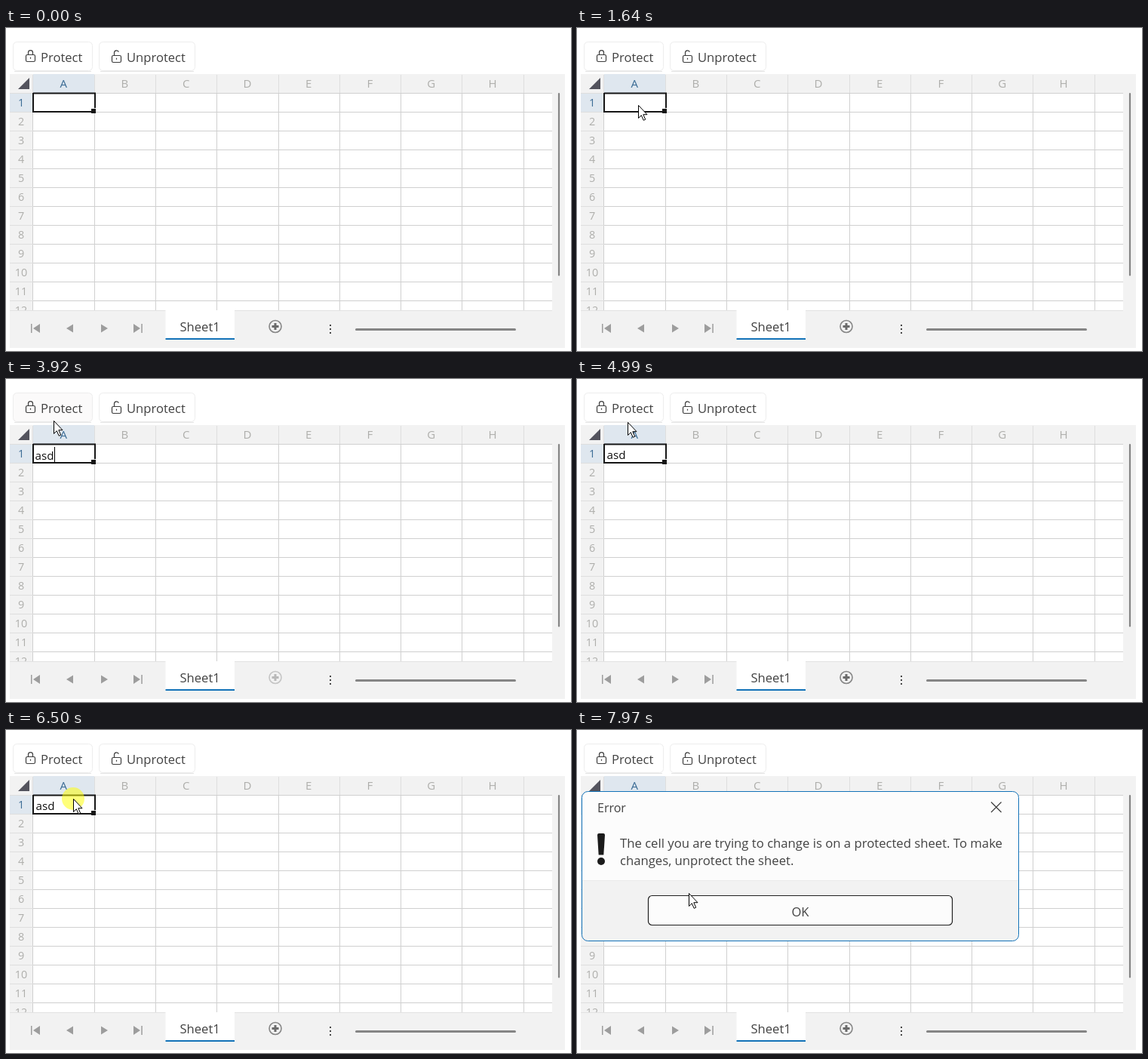
Recreate the animation shown at these times as an HTML page. Size 749 px wide and 428 px high, loop 8000 ms.

```html
<!DOCTYPE html>
<html lang="en">
<head>
<meta charset="utf-8">
<style>
  html, body { margin: 0; width: 100%; height: 100%; overflow: hidden; background: #fff; }
  svg { display: block; }
  text { font-family: "Open Sans", "Noto Sans", sans-serif; font-size: 16.6px; fill: #424242; white-space: pre; }
  .head { font-size: 15px; fill: #aeaeab; text-anchor: middle; }
  .row { font-size: 14.4px; }
  .active { fill: #3b6c95; }
  .cell { font-size: 15.2px; fill: #111; }
  .message { font-size: 16.7px; }
  .button { fill: #fff; stroke: #ededed; }
  .lock { fill: none; stroke: #3c3c3c; stroke-width: 1.2; }
  .nav { fill: #9d9d9d; }
</style>
</head>
<body>
<svg width="749" height="428" viewBox="0 0 749 428">
  <path d="M11 57.5H113M125 57.5H249" stroke="#e4e4e4"/>
  <rect class="button" id="protect" x="9.5" y="18.5" width="105" height="38" rx="5"/>
  <rect class="button" x="123.5" y="18.5" width="127" height="38" rx="5"/>
  <g class="lock">
    <rect x="26.5" y="35.5" width="12" height="9" rx="1.8"/>
    <path d="M29.5 35V32.5a3 2.8 0 0 1 6 0V35M32.5 38.8v2"/>
    <rect x="140.5" y="36.5" width="12" height="9" rx="1.8"/>
    <path d="M143.500 36V32.500a3 2.800 0 0 1 5.800-.8M146.500 39.800v2"/>
  </g>
  <text x="46" y="45">Protect</text>
  <text x="160" y="45">Unprotect</text>

  <rect x="5" y="61" width="736" height="363" fill="#f2f2f2"/>
  <rect x="36" y="86" width="688" height="289" fill="#fff"/>
  <path d="M36 61h81v25h-81zM5 86h31v25H5z" fill="#dfe7ef"/>
  <path d="M31 66V81H16z" fill="#53535d"/>
  <g id="grid"></g>
  <path d="M36 86.500H118V106M36 86V111H113" fill="none" stroke="#161616" stroke-width="2"/>
  <rect x="113" y="107" width="6" height="6" fill="#161616"/>
  <text class="cell" id="value"></text>
  <rect id="caret" y="90" width="1" height="20"/>

  <path d="M5 374.5H724" stroke="#e2e2e2"/>
  <rect x="5" y="375" width="736" height="49" fill="#f2f2f2"/>
  <rect x="211.5" y="374" width="91.5" height="39" fill="#fff"/>
  <rect x="211.5" y="411" width="91.5" height="2" fill="#1272b8"/>
  <text x="230.5" y="402">Sheet1</text>
  <path class="nav" d="M33 392h1.5v12H33zM45 392v12l-9-6zM89 392.5v11l-9-5.5zM126 392.5v11l9-5.5zM169 392v12l9-6zM179.3 392h1.5v12h-1.5z"/>
  <g id="add" fill="none" stroke="#6b6b6b">
    <circle cx="357" cy="395.5" r="8" stroke-width="1.6" opacity=".8"/>
    <path d="M352.5 395.5h9M357 391v9" stroke-width="3"/>
  </g>
  <path d="M429 393h2v2h-2zM429 398h2v2h-2zM429 403h2v2h-2z" fill="#454545"/>
  <path d="M464.5 399.5H674.5" stroke="#858585" stroke-width="3" stroke-linecap="round"/>
  <path d="M733 87V327.5" stroke="#858585" stroke-width="2.2" stroke-linecap="round"/>

  <g id="dialog">
    <rect x="6.5" y="81.5" width="579" height="198" rx="8" fill="#fcfcfc"/>
    <path d="M6.5 199.5H585.5V271.5a8 8 0 0 1-8 8H14.5a8 8 0 0 1-8-8z" fill="#f2f2f2"/>
    <path d="M7 199.5H585" stroke="#ebebeb"/>
    <rect x="6.5" y="81.5" width="579" height="198" rx="8" fill="none" stroke="#1272b8"/>
    <text x="27" y="108.5" style="font-size:16px">Error</text>
    <path d="M549 95.5l13.5 13.5M562.5 95.5L549 109" stroke="#3c3c3c" stroke-width="1.2"/>
    <path d="M27 139q.2-2 2-2h6q1.800 0 2 2l-1.700 26.500h-6.600z" fill="#1b1b1b"/>
    <circle cx="32" cy="174" r="5" fill="#1b1b1b"/>
    <text class="message" x="57" y="156">The cell you are trying to change is on a protected sheet. To make</text>
    <text class="message" x="57" y="179">changes, unprotect the sheet.</text>
    <rect x="94.5" y="219.5" width="403" height="39" rx="5" fill="#fcfcfc" stroke="#202020" stroke-width="1.2"/>
    <text x="296" y="246.5" text-anchor="middle">OK</text>
  </g>

  <circle id="click" r="15" fill="#ff0" opacity=".52"/>
  <path id="pointer" d="M.5 .5V17.5L4.3 13.7 7.2 20.3 9.7 19.2 6.8 12.7H12z" fill="#fff" stroke="#000"/>
</svg>
<script>
const LOOP = 8000, STEP = 70;
const el = id => document.getElementById(id);
const [grid, protect, value, caret, add, dialog, click, pointer] =
  ['grid', 'protect', 'value', 'caret', 'add', 'dialog', 'click', 'pointer'].map(el);

function drawGrid() {
  let lines = '', heads = '', labels = '';
  for (let c = 0; c <= 8; c++) {
    const x = Math.floor(36 + c * 81.25) + (c ? .5 : -.5);
    lines += `M${x} 86V374`;
    heads += `M${x} 62V86`;
    if (c < 8) labels += `<text class="head ${c ? '' : 'active'}" x="${76.2 + c * 81.25}" y="79">${'ABCDEFGH'[c]}</text>`;
  }
  for (let r = 0; r < 12; r++) {
    const y = 86 + r * 25;
    lines += `M36 ${y + .5}H724`;
    heads += `M5 ${y + .5}H36`;
    labels += `<text class="head row ${r ? '' : 'active'}" x="20" y="${y + 18}">${r + 1}</text>`;
  }
  grid.innerHTML = `<path d="${lines}" stroke="#d0d0d0"/><path d="${heads}" stroke="#dedede"/>${labels}`;
}

// Each move: start time, number of steps, x, y
const moves = [
  [0, 1, 716, 390], [130, 11, 96, 90], [960, 1, 94, 91], [1160, 2, 81, 112], [1380, 2, 81, 102],
  [2640, 1, 66, 62], [3720, 1, 63, 57], [3920, 1, 63, 55], [4050, 2, 62, 47],
  [4990, 6, 134, 178], [5610, 1, 126, 166], [5680, 3, 61, 101], [6090, 3, 89, 91],
  [6770, 3, 81, 91], [7170, 3, 73, 101], [7560, 3, 148, 205], [7900, 2, 148, 216]
];
const smooth = p => p * p * (3 - 2 * p);

function pointerAt(t) {
  const i = moves.findLastIndex(m => m[0] <= t);
  const [start, steps, x, y] = moves[i];
  const [, , px, py] = moves[Math.max(0, i - 1)];
  const p = smooth(Math.min(1, (Math.floor((t - start) / STEP) + 1) / steps));
  return [Math.round(px + (x - px) * p), Math.round(py + (y - py) * p)];
}

const within = (t, spans) => spans.some(([from, to]) => t >= from && t < to);
const show = (node, on) => node.setAttribute('visibility', on ? 'visible' : 'hidden');

function render(t) {
  const [x, y] = pointerAt(t);
  pointer.setAttribute('transform', `translate(${x} ${y})`);
  click.setAttribute('transform', `translate(${x} ${y})`);
  show(pointer, within(t, [[130, 2640], [3650, LOOP]]));
  show(click, within(t, [[1500, 1640], [1690, 1770], [4260, 4460], [6300, 6430], [6500, 6560]]));
  show(dialog, t >= 6560);

  const editing = within(t, [[1840, 4260]]);
  const typed = t < 2640 ? 0 : Math.min(3, Math.floor((t - 2640) / STEP) + 1);
  value.textContent = 'asd'.slice(0, typed);
  value.setAttribute('x', editing ? 38.5 : 39.5);
  value.setAttribute('y', editing ? 107 : 106);
  caret.setAttribute('x', Math.round(38.7 + value.getComputedTextLength()));
  show(caret, within(t, [[1840, 2310], [2640, 3450], [3920, 4260]]));

  add.setAttribute('opacity', within(t, [[1840, 4990]]) ? .42 : 1);
  protect.style.fill = within(t, [[4260, 4990]]) ? '#f5f5f5' : within(t, [[3720, 4260]]) ? '#fbfafa' : '#fff';
}

drawGrid();
const begin = performance.now();
(function frame() {
  render((performance.now() - begin) % LOOP);
  requestAnimationFrame(frame);
})();
</script>
</body>
</html>
```
